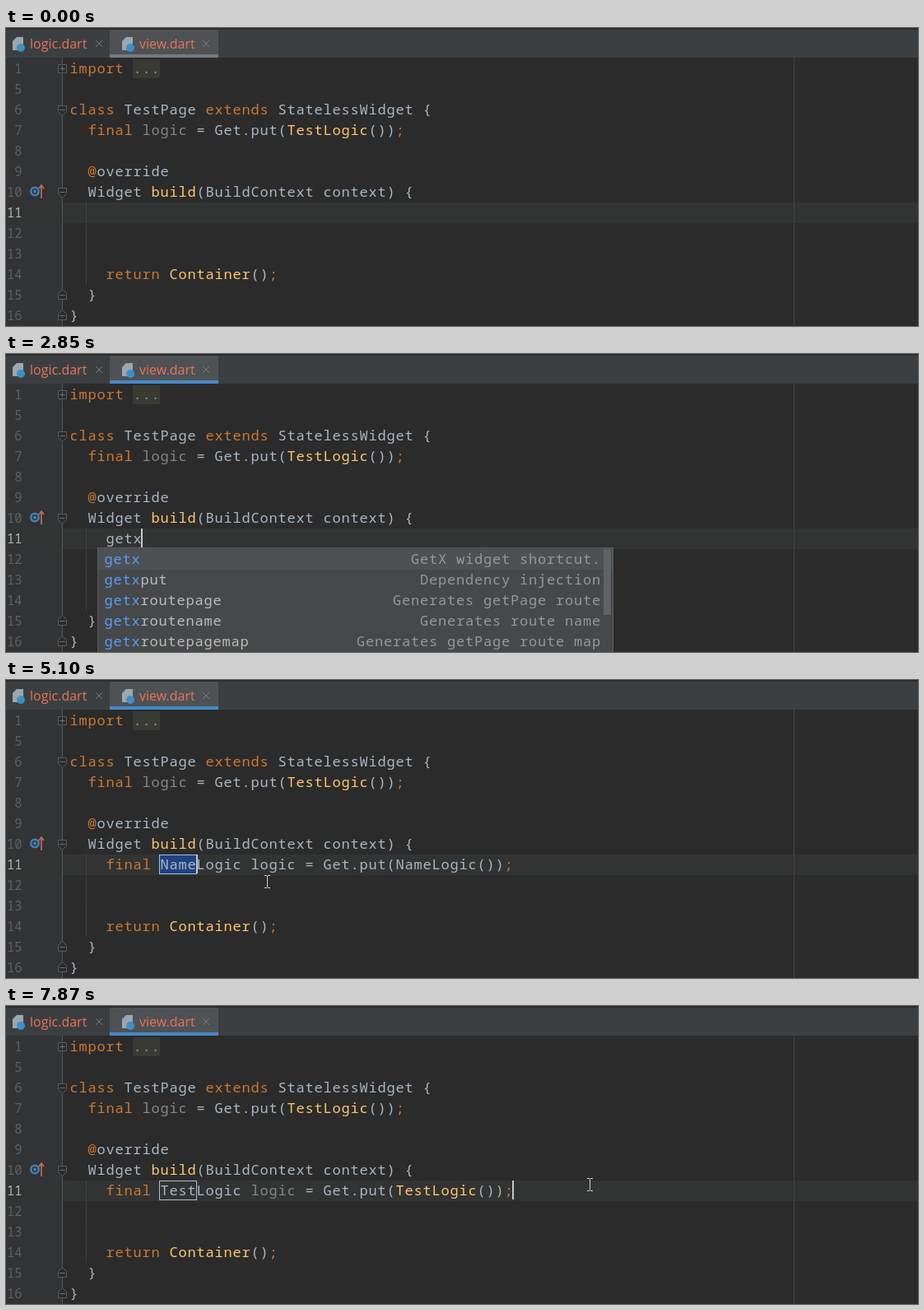
These frames come from a looping animation (1108x362 px, 8 s). An HTML page with a canvas:

```html
<!DOCTYPE html>
<html lang="en">
<head>
<meta charset="utf-8">
<title>Editor template completion</title>
<style>
html, body { margin: 0; width: 100%; height: 100%; overflow: hidden; background: #2b2b2b; }
canvas { display: block; }
</style>
</head>
<body>
<canvas id="stage" width="1108" height="362"></canvas>
<script>
const g = document.getElementById('stage').getContext('2d');
const LOOP = 8000, COL = 11, ROW = 25, LEFT = 77;
const KEY = '#cc7832', TXT = '#a9b7c6', FN = '#ffc66d', DIM = '#83868a';
const MONO = '"Noto Sans Mono", "DejaVu Sans Mono", monospace';
const SANS = '"Liberation Sans", Arial, sans-serif';
const UI = '"Open Sans", "Noto Sans", sans-serif';
const CODE = '17px ' + MONO;
const WORD = '20px "Noto Sans Mono CJK SC", "Noto Sans CJK SC", monospace';

// Tracking that brings the code font to whole columns
g.font = CODE;
const tracking = COL - g.measureText('0').width + 'px';

const colX = c => LEFT + c * COL;
const rowY = r => 49 + r * ROW;

function rect(x, y, w, h, color) {
  g.fillStyle = color;
  g.fillRect(x, y, w, h);
}
function box(x, y, w, h, color) {
  g.strokeStyle = color;
  g.lineWidth = 1;
  g.strokeRect(x + .5, y + .5, w - 1, h - 1);
}
function text(s, x, y, color, font = CODE, align = 'left') {
  g.font = font;
  g.letterSpacing = font === CODE ? tracking : '0px';
  g.fillStyle = color;
  g.textAlign = align;
  g.fillText(s, x, y);
}
function shape(points, fill, stroke, width = 1, open) {
  g.beginPath();
  points.forEach(([x, y]) => g.lineTo(x, y));
  if (!open) g.closePath();
  if (fill) { g.fillStyle = fill; g.fill(); }
  if (stroke) { g.strokeStyle = stroke; g.lineWidth = width; g.stroke(); }
}
function ellipse(x, y, rx, ry, color) {
  g.fillStyle = color;
  g.beginPath();
  g.ellipse(x, y, rx, ry, 0, 0, 7);
  g.fill();
}
// parts: color, string, color, string ...
function code(row, col, ...parts) {
  for (let i = 0; i < parts.length; i += 2) {
    text(parts[i + 1], colX(col) + .4, rowY(row) + 6, parts[i]);
    col += parts[i + 1].length;
  }
}

function tab(x, label, width, active, focused) {
  if (active) {
    rect(x, 2, 132, 34, '#4e5254');
    rect(x, 32, 132, 4, focused ? '#4a88c7' : '#747a80');
  }
  const ix = active ? x + 15 : 8;
  shape([[ix + 5, 11], [ix + 13, 11], [ix + 13, 27], [ix, 27], [ix, 16]], '#9aa7b0');
  ellipse(ix + 10, 24, 5, 5, '#3f8fc7');
  const tx = active ? 162 : 29;
  text(label, tx, 25, '#e8735a', '16px ' + UI);
  const cx = tx + width;
  shape([[cx - 4, 15], [cx + 4, 23]], null, '#777b7d');
  shape([[cx + 4, 15], [cx - 4, 23]], null, '#777b7d');
}

// kind: 1 opens a block, -1 closes it, 0 is collapsed
function fold(row, kind) {
  const y = rowY(row) + .5, x = 68.5, d = kind;
  const edge = d ? [[x - 5, y - 5 * d], [x + 5, y - 5 * d], [x + 5, y + 2 * d], [x, y + 7 * d], [x - 5, y + 2 * d]]
    : [[x - 5, y - 5], [x + 5, y - 5], [x + 5, y + 5], [x - 5, y + 5]];
  shape(edge, '#2b2b2b', '#5a5d5f');
  shape([[x - 3, y], [x + 3, y]], null, '#6c6f71');
  if (!d) shape([[x, y - 3], [x, y + 3]], null, '#6c6f71');
}

function editor(focused) {
  rect(0, 0, 1108, 362, '#2b2b2b');
  rect(0, 36, 68, 326, '#313335');
  rect(0, 2, 1108, 34, '#3c3f41');
  tab(0, 'logic.dart', 84, false);
  tab(126, 'view.dart', 81, true, focused);
  rect(0, 212, 1108, 25, '#323333');
  rect(68, 36, 1, 326, '#555555');
  rect(957, 36, 1, 326, '#454545');
  for (let y = 212; y < 312; y += 2) rect(97, y, 1, 1, '#565656');

  [1, 5, 6, 7, 8, 9, 10, 11, 12, 13, 14, 15, 16].forEach((n, i) =>
    text(n, 19.5, rowY(i) + 6, n === 11 ? '#a4b4c0' : '#5e6164', '15.5px ' + MONO, 'right'));
  fold(0, 0);
  [2, 6].forEach(r => fold(r, 1));
  [11, 12].forEach(r => fold(r, -1));

  ellipse(35, 198.5, 6, 6, '#3f81b8');
  ellipse(35, 198.5, 3.4, 3.4, '#313335');
  ellipse(35, 198.5, 2, 2, '#3f81b8');
  shape([[43, 207], [43, 191]], null, '#d9694a', 1.6);
  shape([[40, 195], [43, 191], [46, 195]], null, '#d9694a', 1.5, true);

  rect(154, 38, 33, 23, '#3a3a35');
  code(0, 0, KEY, 'import', TXT, ' ', '#9a9a78', '...');
  code(2, 0, KEY, 'class', TXT, ' TestPage ', KEY, 'extends', TXT, ' StatelessWidget {');
  code(3, 2, KEY, 'final', DIM, ' logic', TXT, ' = Get.put(', FN, 'TestLogic', TXT, '())', KEY, ';');
  code(5, 2, KEY, '@', TXT, 'override');
  code(6, 2, TXT, 'Widget ', FN, 'build', TXT, '(BuildContext context) {');
  code(10, 4, KEY, 'return', FN, ' Container', TXT, '()', KEY, ';');
  code(11, 2, TXT, '}');
  code(12, 0, TXT, '}');
}

const caret = x => rect(x, 212, 2, 23, '#c8c8c8');
const composing = x => rect(x + 1, 231, 10, 1, '#a9b7c6');

// The expanded template, with its editable field boxed
function template(name, t) {
  const done = t >= 7870, w = name.length * COL;
  if (name === 'Name') rect(187, 212, w, 24, '#214283');
  code(7, 4, KEY, 'final', TXT, ` ${name}Logic`, done ? DIM : TXT, ' logic', TXT, ' = Get.put(',
    done ? FN : TXT, name + 'Logic', TXT, '())', KEY, ';');
  box(186, 212, w + 2, 24, '#a9c0d6');
  if (name === ' ') composing(187);
  caret(t >= 7450 ? 615 : name === ' ' ? 187 : 231);
}

function popup(x, right, h, rows, prefix, icons, details = true) {
  rect(x, 235, right - x, h, '#46484a');
  rect(x + 1, 237, right - x - 2, 25, '#4d5153');
  box(x, 235, right - x, h, '#5c5f61');
  const tx = x + (icons ? 36 : 8);
  const inset = h > 100 ? 15 : 7;
  rows.forEach(([name, note], i) => {
    const y = 255 + i * ROW;
    if (icons) {
      ellipse(x + 20, y - 6, 8, 8, '#4a7f97');
      text('C', x + 20, y - 1, '#d5dde2', '13px ' + SANS, 'center');
    }
    text(prefix, tx + .4, y, '#589df6');
    text(name.slice(prefix.length), tx + prefix.length * COL + .4, y, '#bbbbbb');
    if (details) text(note, right - inset, y, '#95989a', CODE, 'right');
  });
  if (h > 100) rect(right - 12, 237, 9, 80, '#606365');
}

// Input method window; it grows with its candidates
function ime(x, top, typed, words) {
  const list = words.split('|').map(word => {
    const cjk = (word.match(/[\u4e00-\u9fff]/g) || []).length;
    return { word, step: 39 + 10 * (word.length + cjk) + 1.5 * cjk };
  });
  const width = 202 + list.reduce((sum, c) => sum + c.step, 0);
  x = Math.min(x, 1092 - width);
  const right = x + width;
  g.beginPath();
  g.roundRect(x + 2.5, top + 3, width - 5, 150, 24);
  g.fillStyle = '#fdfdfd';
  g.fill();
  g.strokeStyle = '#000';
  g.lineWidth = 5;
  g.stroke();

  text(typed, x + 28, top + 51, '#000', '21px ' + SANS);
  rect(Math.round(x + 28 + g.measureText(typed).width), top + 31, 1, 24, '#000');
  let cx = x + 28;
  list.forEach(({ word, step }, i) => {
    text(i + 1 + '.', cx, top + 97, '#000', '20px ' + SANS);
    text(word, cx + 15, top + 97, '#000', WORD);
    cx += step;
  });
  const y = top + 91;
  shape([[right - 174, y], [right - 165, y - 8], [right - 165, y + 8]], '#aaa');
  shape([[right - 148, y], [right - 157, y - 8], [right - 157, y + 8]], list.length > 5 ? '#000' : '#aaa');
  box(Math.round(right - 143), y - 7, 15, 15, '#777');
  shape([[right - 139, y - 1], [right - 132, y - 1], [right - 135.5, y + 3]], '#000');
  ellipse(right - 69, top + 84, 39, 28, '#1c1c1c');
}

const pick = (stages, t) => stages.filter(s => s[0] <= t).pop();

const getStages = [
  [1910, 'g', '个|给|过|国|高|该|更|跟|古'],
  [2050, 'ge', '个|各|哥|歌|格|隔|葛|阁|革'],
  [2190, 'get', 'get|个推|个图|个体|隔天|个头|哥特|哥谭|个痛'],
  [2460, 'getx', 'getx|个体下|个推|个图|个体|隔天|个头|哥特|个痛']];
const putStages = [
  [3200, 'p', '平|片|跑|怕|配|票|品|拍|排'],
  [3340, 'pu', '普|铺|扑|谱|朴|葡|仆|浦|瀑'],
  [3480, 'put', 'put|普通|葡萄|铺天|扑腾|普天|铺贴|仆头|普特']];
const testStages = [
  [5690, 'T', 'T|他|她|它|特'],
  [5890, 'Te', 'Te|特|TE|忒|T'],
  [6040, 'Tes', 'Test|Tes|TES|TES TOP|T'],
  [6240, 'Test', 'Test|TEST|test|Tes|T']];

const getRows = [
  ['getx', 'GetX widget shortcut.'],
  ['getxput', 'Dependency injection'],
  ['getxroutepage', 'Generates getPage route'],
  ['getxroutename', 'Generates route name'],
  ['getxroutepagemap', 'Generates getPage route map']];
const putRows = [
  ['getxput', 'Dependency injection'],
  ['getxputtag', 'Dependency injection tag']];
const testRows = [
  ['TestLogic', 'logic.dart'],
  ['TestPage', 'view.dart'],
  ['TestWindow', 'flutter_test'],
  ['TestGesture', 'flutter_test'],
  ['TestPointer', 'flutter_test']];

function lineEleven(t) {
  if (t >= 4340) {
    template(t < 5690 ? 'Name' : t < 6400 ? ' ' : 'Test', t);
    if (t >= 5690 && t < 6400) ime(201, 248, ...pick(testStages, t).slice(1));
    if (t >= 6400 && t < 6990) popup(151, 778, 140, testRows, 'Test', true, t >= 6510);
    return;
  }
  const typed = t < 2580 ? '' : t < 3660 ? 'getx' : 'getxput';
  const x = colX(4 + typed.length);
  code(7, 4, TXT, typed);
  if (t >= 1380) caret(x - (typed ? 1 : 0));
  const stages = t >= 1910 && t < 2580 ? getStages : t >= 3200 && t < 3660 ? putStages : null;
  if (stages) {
    composing(x);
    ime(x + 13, 263, ...pick(stages, t).slice(1));
  }
  if (t >= 2850 && t < 3200) popup(111, 738, 140, getRows, 'getx');
  if (t >= 3880) {
    popup(111, 717, 77, putRows, 'getxput');
    text('Press Ctrl+. to choose the selected (or first) suggestion and insert a dot afterwards',
      119, 304, '#8c8f91', '14px ' + UI);
  }
}

// Pointer way points: time, x, y
const path = [
  [70, 622, 324], [410, 431, 286], [670, 430, 285], [810, 429, 285], [1380, 300, 235],
  [4550, 300, 235], [4800, 310, 300], [5100, 317, 245], [6990, 317, 245],
  [7300, 640, 209], [7520, 709, 217]];

function mouse(t) {
  if (t < 70 || (t >= 2580 && t < 4550) || (t >= 6400 && t < 6840)) return;
  if (t >= 6840 && t < 6990) {
    const arrow = [[0, 0], [0, 17], [4, 13], [7, 19], [10, 18], [7, 12], [13, 12]];
    shape(arrow.map(([x, y]) => [x + 315.5, y + 244]), '#fff', '#000');
    return;
  }
  let i = path.findIndex(p => p[0] > t);
  if (i < 0) i = path.length - 1;
  const [t0, x0, y0] = path[i - 1], [t1, x1, y1] = path[i];
  const k = Math.min(1, (t - t0) / (t1 - t0));
  const x = Math.round(x0 + (x1 - x0) * k), y = Math.round(y0 + (y1 - y0) * k);
  const c = '#d0d0d0';
  rect(x, y - 7, 1, 14, c);
  for (const dy of [-8, 7]) {
    rect(x - 3, y + dy, 3, 1, c);
    rect(x + 1, y + dy, 3, 1, c);
  }
}

function draw() {
  const t = performance.now() % LOOP;
  editor(t >= 1380);
  lineEleven(t);
  mouse(t);
  requestAnimationFrame(draw);
}
draw();
</script>
</body>
</html>
```
